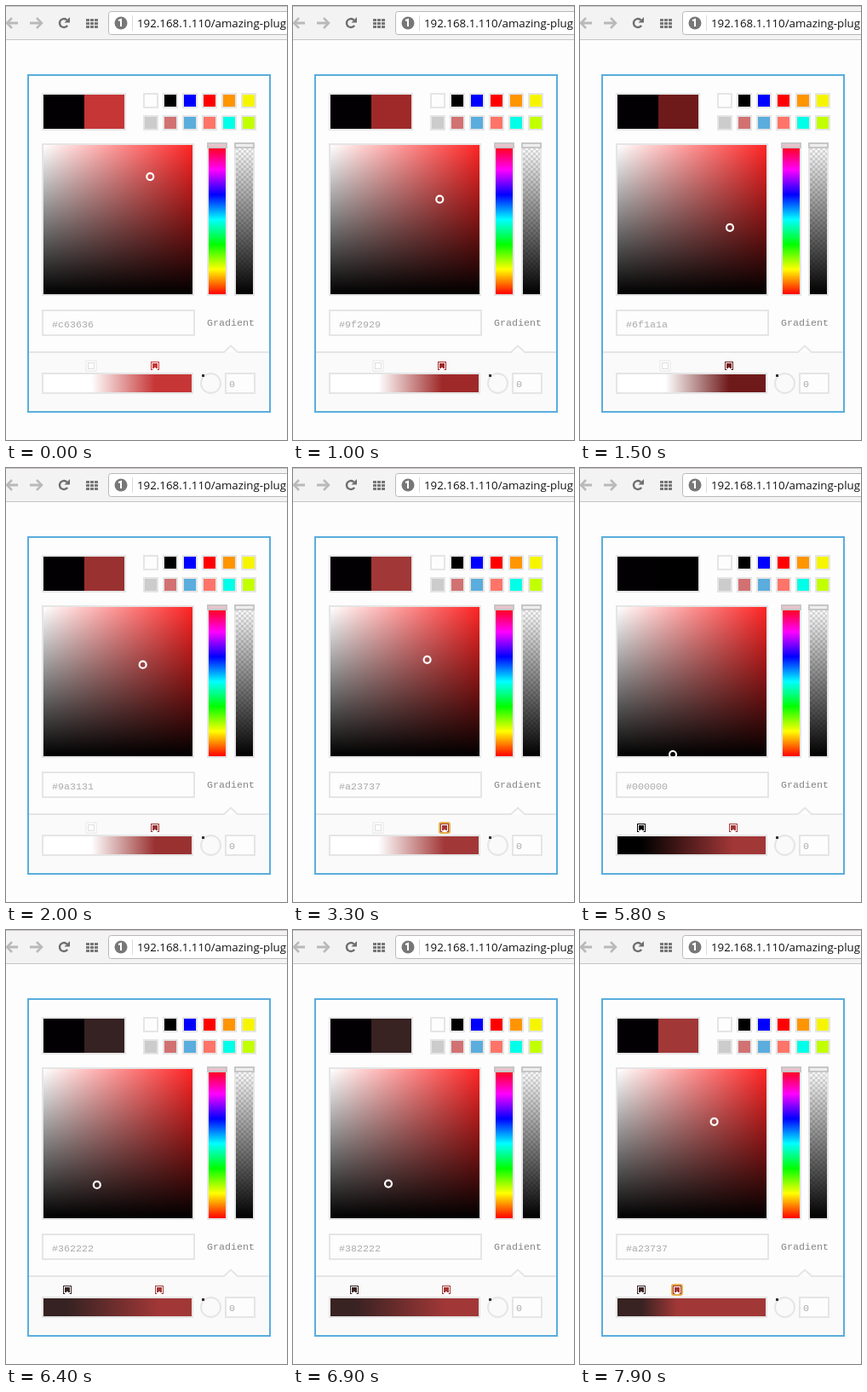
Animation of 330 by 509 pixels, one loop 8 s. Source, as an HTML page with a canvas:

```html
<!DOCTYPE html>
<html lang="en">
<head>
<meta charset="utf-8">
<title>Color picker</title>
<style>
html, body { margin: 0; height: 100%; overflow: hidden; background: #fdfdfd; }
canvas { display: block; }
</style>
</head>
<body>
<canvas id="stage" width="330" height="509"></canvas>
<script>
const g = document.getElementById('stage').getContext('2d');
const LOOP = 8000, BG = '#fdfdfd', LINE = '#e5e5e5';
const MONO = '11.67px "Liberation Mono", monospace';

// Picked colour: time, red value, saturation (hue is always red)
const PICK = [
  [600, 198, 144 / 198], [1500, 111, 85 / 111], [2100, 162, 107 / 162],
  [4599, 162, 107 / 162], [4600, 255, 0], [5300, 255, 0],
  [5500, 150, .3], [5800, 0, .383], [6100, 0, .36], [6400, 54, 20 / 54],
  [6600, 64, .4], [6900, 56, .4], [7699, 56, .4], [7700, 162, 107 / 162]
];
// Positions of the two gradient stops
const LEFT = [[4600, 100], [4800, 72]];
const RIGHT = [[3200, 175], [3300, 178], [3500, 206], [3600, 206], [4000, 180], [7700, 180], [7900, 114]];

function at(keys, t) {
  let i = keys.findIndex(k => k[0] > t);
  if (i < 0) i = keys.length;
  const a = keys[Math.max(i - 1, 0)], b = keys[Math.min(i, keys.length - 1)];
  const p = a === b ? 0 : (t - a[0]) / (b[0] - a[0]);
  return a.slice(1).map((v, n) => v + (b[n + 1] - v) * p);
}

function hex([r, s]) {
  const two = v => Math.round(v).toString(16).padStart(2, '0');
  return '#' + two(r) + two(r * (1 - s)).repeat(2);
}

function rect(x, y, w, h, c) {
  g.fillStyle = c;
  g.fillRect(x, y, w, h);
}

function box(x, y, w, h, fill, line = LINE) {
  rect(x, y, w, h, line);
  rect(x + 2, y + 2, w - 4, h - 4, fill);
}

function text(s, x, y, c, font = MONO) {
  g.font = font;
  g.fillStyle = c;
  g.fillText(s, x, y);
}

function path(points, c, width) {
  g.beginPath();
  points.forEach(p => g.lineTo(...p));
  g.strokeStyle = c;
  g.lineWidth = width;
  g.stroke();
}

function ring(x, y, r, c, width, from = 0, to = 7) {
  g.beginPath();
  g.arc(x, y, r, from, to);
  g.strokeStyle = c;
  g.lineWidth = width;
  g.stroke();
}

function ramp(x0, y0, x1, y1, ...stops) {
  const l = g.createLinearGradient(x0, y0, x1, y1);
  stops.forEach(([p, c]) => l.addColorStop(p, c));
  return l;
}

function toolbar() {
  rect(0, 0, 330, 39, '#f4f3f3');
  rect(0, 0, 330, 1, '#c9c3c4');
  rect(0, 39, 330, 1, '#c4c4c4');
  for (const [tip, tail, d] of [[0, 14, 1], [43, 28, -1]]) {
    path([[tail, 20], [tip + d * 2, 20]], '#b9b9b9', 3);
    path([[tip + d * 7, 14], [tip + d, 20], [tip + d * 7, 26]], '#b9b9b9', 2.5);
  }
  ring(68, 20, 5, '#6e6e6e', 2.4, .6, 5.5);
  g.beginPath();
  g.moveTo(75, 13); g.lineTo(75, 19.5); g.lineTo(68.5, 19.5);
  g.fillStyle = '#6e6e6e';
  g.fill();
  for (let i = 0; i < 9; i++) rect(94 + i % 3 * 5, 15 + (i / 3 | 0) * 4, 4, 3, '#777');

  g.beginPath();
  g.roundRect(120.5, 6.5, 230, 27, 3);
  g.fillStyle = '#fff';
  g.fill();
  g.strokeStyle = '#b8b8b8';
  g.lineWidth = 1;
  g.stroke();
  g.beginPath();
  g.arc(135, 20, 7.5, 0, 7);
  g.fillStyle = '#777';
  g.fill();
  path([[132, 17], [135, 16], [135, 24]], '#fff', 2);
  rect(148, 11, 1, 18, '#dadada');
  text('192.168.1.110/amazing-plugin', 154, 24.5, '#111', '13.3px "Open Sans", sans-serif');
}

function swatches() {
  ['#fdfdfd', '#000', '#00f', '#f00', '#ff9500', '#f5f500',
   '#ccc', '#d27172', '#5aaddc', '#ff7468', '#00ffe8', '#c2ff00']
    .forEach((c, i) => box(161 + i % 6 * 23, i < 6 ? 102 : 128, 18, 18, c));
}

function sliders() {
  box(236, 161, 24, 179, ramp(0, 163, 0, 338,
    ...['#f00', '#f0f', '#00f', '#0ff', '#0f0', '#ff0', '#f00'].map((c, i) => [i / 6, c])));
  box(268, 161, 24, 179, '#fff');
  for (let y = 163; y < 338; y += 3)
    for (let x = 270; x < 290; x += 3)
      if ((x - 270 + y - 163) % 2) rect(x, y, Math.min(3, 290 - x), Math.min(3, 338 - y), '#ddd');
  rect(270, 163, 20, 175, ramp(0, 163, 0, 338, [0, '#0000'], [1, '#000']));
  for (const [x, c] of [[236, '#e9c3cc'], [268, '#eee']]) box(x, 160, 24, 7, c, '#c6c6c6');
}

function field([r, s]) {
  box(42, 161, 179, 179, ramp(44, 0, 219, 0, [0, '#fff'], [1, '#ff2424']));
  rect(44, 163, 175, 175, ramp(0, 163, 0, 338, [0, '#0000'], [1, '#000']));
  g.save();
  g.beginPath();
  g.rect(42, 161, 179, 179);
  g.clip();
  ring(42 + 175 * s, 161 + 175 * (1 - r / 255), 4, '#fff', 2.2);
  g.restore();
}

function marker(x, c, hot) {
  const white = c === '#ffffff';
  g.beginPath();
  g.roundRect(x - 6, 416, 12, 12, hot ? 2 : 0);
  g.fillStyle = '#fff';
  g.fill();
  if (hot || white) {
    g.strokeStyle = hot ? '#e5b04c' : LINE;
    g.lineWidth = hot ? 2 : 1;
    g.stroke();
  }
  g.lineWidth = 1;
  if (white) {
    g.strokeStyle = '#ddd';
    g.strokeRect(x - 3.5, 418.5, 7, 7);
    return;
  }
  g.strokeStyle = c;
  g.strokeRect(x - 4.5, 417.5, 9, 9);
  rect(x - 3, 419, 6, 6, c);
  g.beginPath();
  g.moveTo(x - 3, 427); g.lineTo(x, 423.5); g.lineTo(x + 3, 427);
  g.fillStyle = '#fff';
  g.fill();
}

function gradientPane(a, b, ca, cb, hotA, hotB) {
  rect(27, 406, 282, 69, '#fafafa');
  path([[27, 406], [256, 406], [264, 398.5], [272, 406], [309, 406]], LINE, 2);
  box(42, 430, 178, 25, ramp(44, 0, 218, 0, [(a - 44) / 174, ca], [(b - 44) / 174, cb]));
  marker(a, ca, hotA);
  marker(b, cb, hotB);
  ring(240.5, 442.5, 11.5, LINE, 2);
  rect(230, 432, 3, 3, '#333');
  box(257, 430, 36, 25, BG);
  text('0', 262, 447, '#aaa');
}

function draw(now) {
  const t = Math.floor(now % LOOP / 100) * 100;
  const pick = at(PICK, t), c = hex(pick);
  const leftOn = t >= 4600 && t < 7700;
  const ca = leftOn ? c : t < 4600 ? '#ffffff' : hex(at(PICK, 7600));
  const cb = leftOn ? '#a23737' : c;

  rect(0, 0, 330, 509, BG);
  toolbar();
  box(25, 80, 286, 397, BG, '#5aaddc');
  box(42, 102, 99, 44, '#030003');
  rect(92, 104, 47, 40, c === '#ffffff' ? '#fafafa' : c);
  swatches();
  field(pick);
  sliders();
  box(42, 356, 180, 31, BG);
  text(c, 54, 377, '#aaa');
  text('Gradient', 236, 375, '#858585');
  gradientPane(Math.round(at(LEFT, t)[0]), Math.round(at(RIGHT, t)[0]), ca, cb,
    t >= 4600 && t < 5400, t >= 3300 && t < 4600 || t >= 7700);
}

const start = performance.now();
function tick() {
  draw(performance.now() - start);
  requestAnimationFrame(tick);
}
tick();
</script>
</body>
</html>
```
